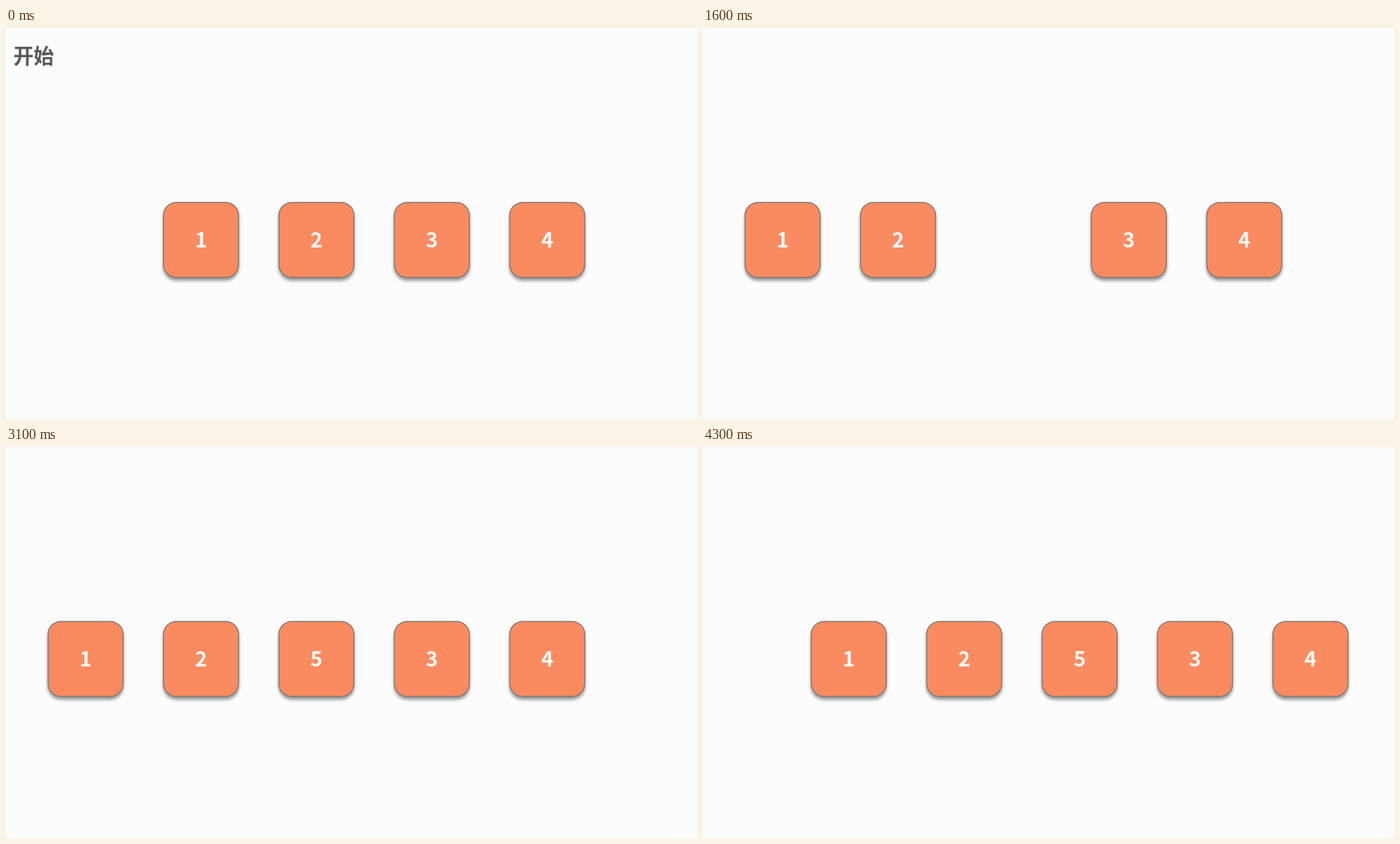
An HTML page that plays this animation: 995x563 px, repeating every 4500 ms.

```html
<!DOCTYPE html>
<html lang="zh-CN">
<head>
<meta charset="utf-8">
<style>
  html, body { margin: 0; width: 100%; height: 100%; overflow: hidden; background: #fcfcfc; }
  svg { display: block; width: 995px; height: 563px; }
  text { font: bold 29.33px "Noto Sans CJK SC", "Noto Sans CJK", "Noto Sans", sans-serif; }
  #title { fill: #595959; }
  .tile { filter: drop-shadow(0 4px 2.2px rgba(0, 0, 0, .4)); }
  .tile rect { fill: #fa8b60; stroke: #7b7672; stroke-width: 1.4px; }
  .tile text { fill: #fff; text-anchor: middle; }
</style>
</head>
<body>
<svg id="stage" viewBox="0 0 995 563">
  <text id="title" x="10.5" y="51">开始</text>
</svg>
<script>
const LOOP = 4500, TICK = 100;
const GAP = 166.2, FIRST_X = 114.6, ROW_Y = 305.2;
const stage = document.getElementById('stage');
const title = document.getElementById('title');

function makeTile(label) {
  const tile = document.createElementNS('http://www.w3.org/2000/svg', 'g');
  tile.setAttribute('class', 'tile');
  tile.innerHTML = `<rect x="-54" y="-54" width="108" height="108" rx="18.5"/>
    <text y="10.3">${label}</text>`;
  return stage.appendChild(tile);
}

// Tiles in their final order, left to right.
const tiles = ['1', '2', '5', '3', '4'].map(makeTile);

const progress = (t, start, duration) =>
  Math.min(1, Math.max(0, (t - start) / duration));

function draw(t) {
  const makeRoom = 1 - progress(t, 631, 670);
  const flyIn = 1 - progress(t, 1913, 500);
  const shift = progress(t, 3207, 670);

  title.style.display = t < 600 ? '' : 'none';
  tiles.forEach((tile, slot) => {
    const x = FIRST_X + GAP * (slot + (slot < 2 ? makeRoom : 0)) + 95.3 * shift;
    const y = ROW_Y - (slot === 2 ? 370 * flyIn : 0);
    tile.setAttribute('transform', `translate(${x} ${y})`);
  });
  tiles[2].style.display = flyIn < 1 ? '' : 'none';
}

function frame() {
  const t = performance.now() % LOOP;
  draw(Math.floor(t / TICK) * TICK);
  requestAnimationFrame(frame);
}
frame();
</script>
</body>
</html>
```
